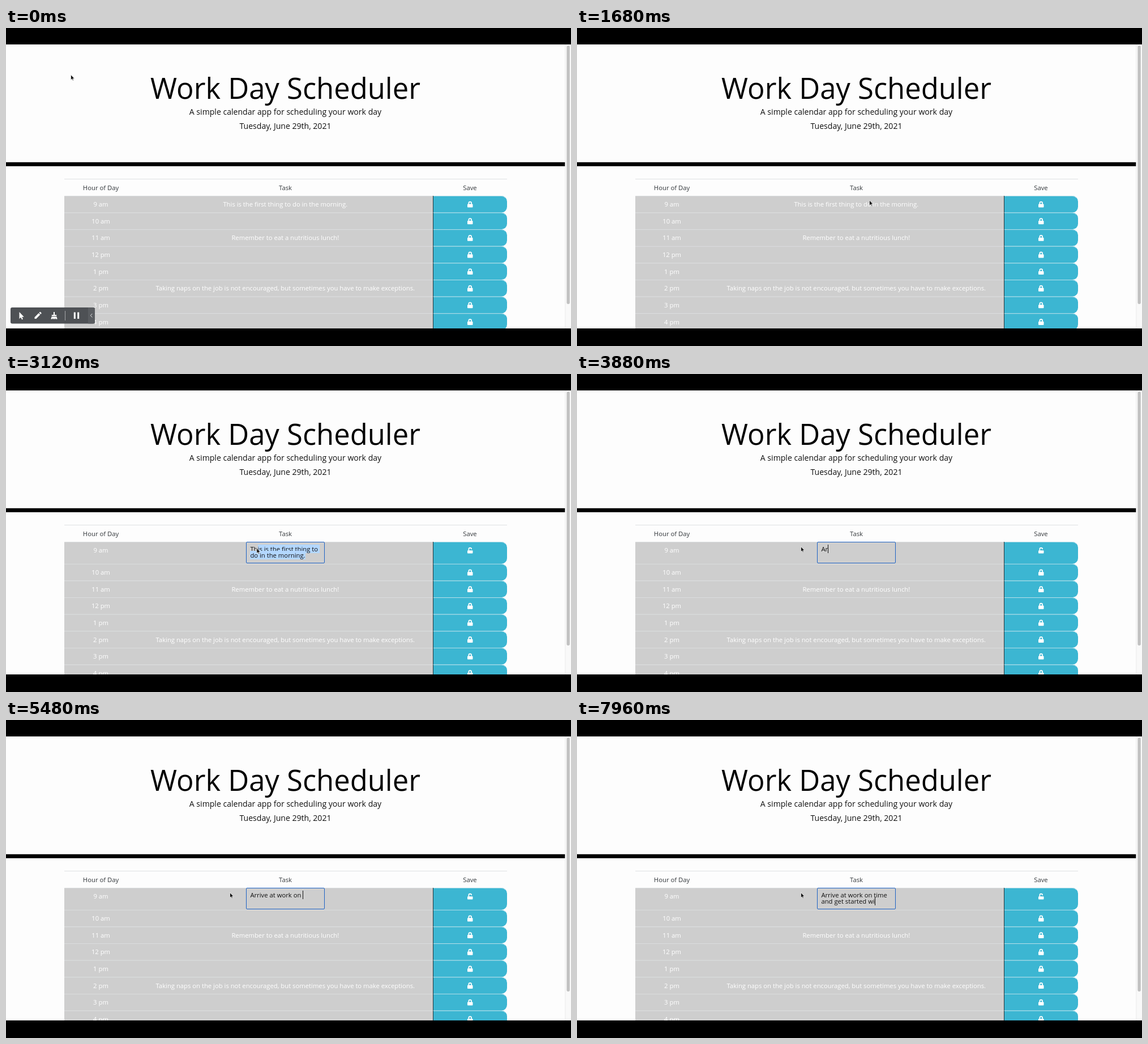
An HTML page that plays this animation: 998x561 px, repeating every 8 s.

```html
<!DOCTYPE html>
<html lang="en">
<head>
<meta charset="utf-8">
<title>Work Day Scheduler</title>
<style>
  html, body { margin: 0; width: 100%; height: 100%; overflow: hidden; background: #000; }
  #stage { position: relative; width: 998px; height: 561px; overflow: hidden; }
  svg { position: absolute; left: 0; top: 0; }
  svg, #editor { font: 11.27px "Open Sans", sans-serif; }
  text { text-anchor: middle; }
  #editor {
    position: absolute; left: 423.5px; top: 296px; width: 139.5px; height: 37.5px;
    box-sizing: border-box; border: 1.6px solid #1d62c4; border-radius: 2px;
    padding: 6px 6.9px; line-height: 11.27px; white-space: pre-wrap; color: #111;
  }
  #picked { background: #b3d7ff; }
  #caretSpot { position: relative; }
  #caret { position: absolute; left: 0; top: 0; width: 1px; height: 15px; background: #111; }
</style>
</head>
<body>
<div id="stage">
  <svg width="998" height="561" viewBox="0 0 998 561">
    <defs>
      <clipPath id="view"><rect y="29" width="998" height="501"/></clipPath>
      <g id="locked" fill="#fff">
        <rect y="224" width="448" height="288" rx="48"/>
        <path d="M112 250V152a112 112 0 0 1 224 0V250" fill="none" stroke="#fff" stroke-width="80"/>
      </g>
      <g id="unlocked" fill="#fff">
        <rect y="256" width="448" height="256" rx="48"/>
        <path d="M112 270V152a112 112 0 0 1 224 0V172" fill="none" stroke="#fff" stroke-width="80"/>
      </g>
    </defs>
    <g clip-path="url(#view)">
      <rect y="29" width="998" height="501" fill="#fdfdfd"/>
      <text x="493.5" y="125" font-size="50.72">Work Day Scheduler</text>
      <text x="493.5" y="152.7" font-size="14.09" fill="#111">A simple calendar app for scheduling your work day</text>
      <text x="493.5" y="178.2" font-size="14.09" fill="#111">Tuesday, June 29th, 2021</text>
      <rect y="236.8" width="988" height="7" fill="#000"/>
      <rect x="103" y="266" width="782" height="1" fill="#dfe1e3"/>
      <g fill="#34383c">
        <text x="167.5" y="285.5">Hour of Day</text>
        <text x="493.5" y="285.5">Task</text>
        <text x="819.5" y="285.5">Save</text>
      </g>
      <g id="closedTable"></g>
      <g id="openTable"></g>
      <rect x="987.5" y="29" width="10.5" height="501" fill="#f9f9f9"/>
      <rect x="987.5" y="29" width="0.8" height="501" fill="#e8e8e8"/>
      <rect id="thumb" x="990.4" y="31" width="5.4" height="456" rx="2.7" fill="#c1c1c1"/>
    </g>
    <g id="toolbar">
      <rect x="8" y="493" width="149" height="28.5" rx="3" fill="#4e5155"/>
      <path d="M145 493h9a3 3 0 0 1 3 3v22.500a3 3 0 0 1-3 3h-9z" fill="#5a5d61"/>
      <rect x="104" y="499" width="1" height="17" fill="#a5a7a9"/>
      <g fill="#fff">
        <path d="M23.500 501V513l2.700-2.500 1.900 4 1.900-.9-1.900-3.900h3.700z"/>
        <path d="M50.500 513v-2.700l7.200-7.200 2.700 2.700-7.200 7.200zM58.500 502.300l1.200-1.200q.6-.5 1.200 0l1.500 1.500q.5.6 0 1.200l-1.200 1.200z"/>
        <path d="M84 501h2v5h3.200v2.300h-8.400v-2.300H84zM80.600 509.200h8.800l1.300 4.300h-2.600l-.6-2-.3 2h-1.900l-.3-2-.3 2h-1.900l-.3-2-.6 2h-2.600z"/>
        <rect x="119.800" y="501.500" width="3" height="11.500"/>
        <rect x="126.200" y="501.500" width="3" height="11.500"/>
      </g>
      <path d="M152.300 504l-3 3.200 3 3.200" fill="none" stroke="#e4e4e4"/>
    </g>
  </svg>
  <div id="editor"><span id="before"></span><span id="picked"></span><span id="caretSpot"><span id="caret"></span></span></div>
  <svg width="998" height="561" viewBox="0 0 998 561">
    <path id="pointer" d="M0 0V9.200L2.100 7.300 3.400 10.300 4.900 9.700 3.600 6.800H6.400Z" fill="#111" stroke="#fff" stroke-width=".7"/>
  </svg>
</div>
<script>
const LOOP = 8000, OPEN_AT = 1900, DRAG_AT = 2560, TYPE_AT = 3760;
const TOP = 296, ROW = 29.62, OPEN_ROW = 38.9;
const OLD_TASK = 'This is the first thing to do in the morning.';
const NEW_TASK = 'Arrive at work on time and get started wi';
const FIRST_LINE = 27;
const HOURS = ['9 am', '10 am', '11 am', '12 pm', '1 pm', '2 pm', '3 pm', '4 pm'];
const TASKS = {
  0: OLD_TASK,
  2: 'Remember to eat a nutritious lunch!',
  5: 'Taking naps on the job is not encouraged, but sometimes you have to make exceptions.'
};
// time, x, y
const POINTER = [
  [0, 114.5, 82.5], [800, 58.300, 27], [960, 58.300, 27], [1720, 520, 306],
  [1960, 520, 306], [2300, 616.500, 317.500], [DRAG_AT, 616.500, 317.500],
  [3360, 395.500, 304.500], [LOOP, 395.500, 304.500]
];
// time, characters typed
const TYPING = [[TYPE_AT, 1], [5460, 18], [7020, 32], [7940, 41], [LOOP, 41]];

const $ = id => document.getElementById(id);
const clamp = (v, lo, hi) => Math.min(hi, Math.max(lo, v));
const smooth = p => p * p * (3 - 2 * p);

function sample(steps, t, ease = p => p) {
  const i = Math.max(1, steps.findIndex(s => s[0] > t));
  const a = steps[i - 1], b = steps[i];
  const p = ease(clamp((t - a[0]) / (b[0] - a[0]), 0, 1));
  return a.slice(1).map((v, k) => v + (b[k + 1] - v) * p);
}

function tableMarkup(open) {
  let y = TOP;
  return HOURS.map((hour, i) => {
    const editing = open && i === 0, h = editing ? OPEN_ROW : ROW;
    const task = editing ? '' : TASKS[i] || '';
    const row = `<g transform="translate(0 ${y})">
      <rect x="103" width="651.500" height="${h + .1}" fill="#cecece"/>
      <rect x="103" width="651.500" height=".8" fill="#dee0e2"/>
      <path d="M754.500 0H875a10 10 0 0 1 10 10V${h - 10}a10 10 0 0 1-10 10H754.500Z" fill="#3cb6d2"/>
      <path d="M755 .4H875a9.600 9.600 0 0 1 7 3" fill="none" stroke="#d3e9ef" stroke-width=".8"/>
      <rect x="754" width="1" height="${h + .1}" fill="#26363b"/>
      <g fill="#fff"><text x="167.500" y="19.200">${hour}</text>
      <text x="493.300" y="19.200">${task}</text></g>
      <use href="#${editing ? 'un' : ''}locked" transform="translate(815 9.700) scale(.0212)"/>
    </g>`;
    y += h;
    return row;
  }).join('');
}

// Index in the old task where the dragged selection begins.
function dragStart(x, y) {
  return Math.round(y > 314.5
    ? FIRST_LINE + clamp((x - 432) / 5.45, 0, OLD_TASK.length - FIRST_LINE)
    : clamp((x - 432) / 4.65, 0, FIRST_LINE - 1));
}

function draw(t) {
  const open = t >= OPEN_AT, typing = t >= TYPE_AT;
  const [x, y] = sample(POINTER, t, smooth);
  $('pointer').setAttribute('transform', `translate(${x} ${y})`);
  $('closedTable').style.display = open ? 'none' : '';
  $('openTable').style.display = open ? '' : 'none';
  $('editor').style.display = open ? '' : 'none';
  $('thumb').setAttribute('height', open ? 448 : 456);
  $('toolbar').style.opacity = clamp((1200 - t) / 200, 0, 1);

  let text = OLD_TASK, start = text.length;
  if (typing) {
    text = NEW_TASK.slice(0, Math.floor(sample(TYPING, t)[0] + 1e-6));
    start = text.length;
  } else if (t >= DRAG_AT) {
    start = dragStart(x, y);
  }
  $('before').textContent = text.slice(0, start);
  $('picked').textContent = text.slice(start);
  $('caret').style.visibility = start < text.length ? 'hidden' : 'inherit';
}

$('closedTable').innerHTML = tableMarkup(false);
$('openTable').innerHTML = tableMarkup(true);

const began = performance.now();
function tick() {
  draw((performance.now() - began) % LOOP);
  requestAnimationFrame(tick);
}
draw(0);
tick();
</script>
</body>
</html>
```
